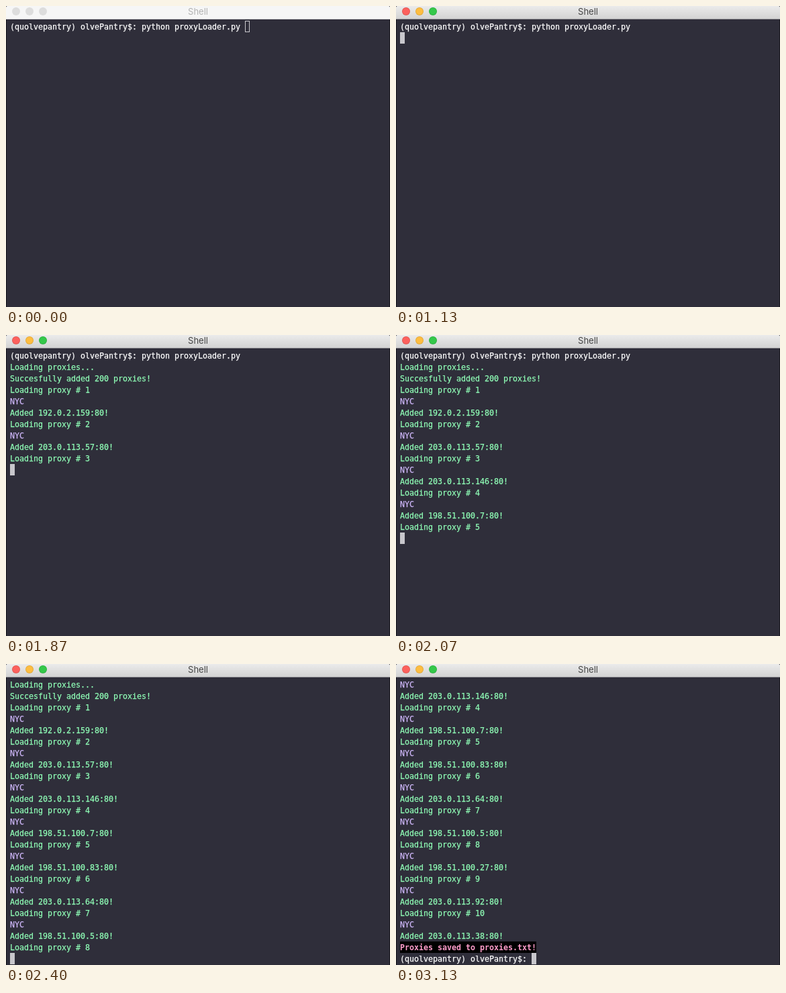
Animation of 572x448 px, one loop 3.47 s. Source, as an HTML page:

```html
<!DOCTYPE html>
<html lang="en">
<head>
<meta charset="utf-8">
<title>Shell</title>
<style>
  html, body { margin: 0; width: 100%; height: 100%; overflow: hidden; background: #17161d; }
  #win {
    position: absolute; left: 0; top: 0; width: 572px; height: 448px;
    overflow: hidden; background: #17161d;
  }
  #bar {
    position: absolute; left: 0; top: 0; width: 572px; height: 19px;
    border-radius: 2px 2px 0 0; border-bottom: 1px solid #929296;
    background: linear-gradient(#ebebeb, #d3d3d3);
    font: 13px/17px Inter, Roboto, sans-serif;
    text-align: center; color: #444;
  }
  #bar i {
    position: absolute; top: 2px; width: 12px; height: 12px;
    border-radius: 50%; box-shadow: inset 0 0 0 1px rgba(0, 0, 0, .1);
  }
  #bar i:nth-child(1) { left: 9px; background: #fc615d; }
  #bar i:nth-child(2) { left: 29px; background: #fdbd41; }
  #bar i:nth-child(3) { left: 49px; background: #34c84a; }
  .idle #bar { background: #f6f6f6; color: #b2b2b2; border-bottom-color: #c9c9cc; }
  .idle #bar i { background: #dddddd; box-shadow: none; }

  #body { position: absolute; left: 1px; top: 20px; width: 570px; height: 428px; background: #2f2e3a; }
  #view { position: absolute; left: 5px; top: 2px; width: 560px; height: 426px; overflow: hidden; }
  #page {
    position: relative;
    font: 11.63px/19px "DejaVu Sans Mono", "Noto Sans Mono", monospace;
    -webkit-text-stroke: .25px;
    white-space: pre; color: #fff;
  }
  #page div { height: 17px; }
  .ok { color: #8ffdb6; }
  .city { color: #cbb4f5; }
  .done { color: #ff9dcb; font-weight: bold; -webkit-text-stroke: 0; }
  .done span { display: inline-block; height: 17px; background: #000; }
  #cursor { position: absolute; left: 0; top: 0; width: 7px; height: 17px; box-sizing: border-box; background: #c8c7cc; }
  .idle #cursor { background: none; border: 1px solid #c8c7cc; }
</style>
</head>
<body>
<div id="win" class="idle">
  <div id="bar"><i></i><i></i><i></i>Shell</div>
  <div id="body"><div id="view"><div id="page"><b id="cursor"></b></div></div></div>
</div>
<script>
const LOOP = 3470, ROWS = 25, LINE = 17, CELL = 7;
const FOCUS = 70, ENTER = 870, START = 1270, SAVED = 2670, PROMPT = 2800;

const prompt = '(quolvepantry) olvePantry$: ';
const loads = [1600, 1730, 1800, 1930, 2070, 2200, 2270, 2400, 2470, 2600];
const hosts = [
  '192.0.2.159', '203.0.113.57', '203.0.113.146', '198.51.100.7', '198.51.100.83',
  '203.0.113.64', '198.51.100.5', '198.51.100.27', '203.0.113.92', '203.0.113.38'
];

const win = document.getElementById('win');
const page = document.getElementById('page');
const cursor = document.getElementById('cursor');
const lines = [];

function add(time, text, style = '') {
  const el = document.createElement('div');
  const span = document.createElement('span');
  el.className = style;
  span.textContent = text;
  el.append(span);
  page.append(el);
  lines.push({ time, el });
}

add(0, prompt + 'python proxyLoader.py ');
add(START, 'Loading proxies...', 'ok');
add(loads[0], 'Succesfully added 200 proxies!', 'ok');
hosts.forEach((host, i) => {
  const next = loads[i + 1] || SAVED;
  add(loads[i], 'Loading proxy # ' + (i + 1), 'ok');
  add(next, 'NYC', 'city');
  add(next, 'Added ' + host + ':80!', 'ok');
});
add(SAVED, 'Proxies saved to proxies.txt!', 'done');
add(PROMPT, prompt);

function draw(t) {
  let shown = 0;
  for (const { time, el } of lines) {
    const on = t >= time;
    el.style.visibility = on ? 'visible' : 'hidden';
    if (on) shown++;
  }
  let row = shown, col = 0;
  if (t < ENTER) {
    row = 0;
    col = 50;
  } else if (t >= PROMPT) {
    row = shown - 1;
    col = prompt.length;
  }
  const scroll = Math.max(0, row - ROWS + 1);
  win.className = t < FOCUS ? 'idle' : '';
  page.style.transform = `translateY(${-scroll * LINE}px)`;
  cursor.style.transform = `translate(${col * CELL}px, ${row * LINE}px)`;
}

const begin = performance.now();
function tick() {
  draw((performance.now() - begin) % LOOP);
  requestAnimationFrame(tick);
}
draw(0);
requestAnimationFrame(tick);
</script>
</body>
</html>
```
